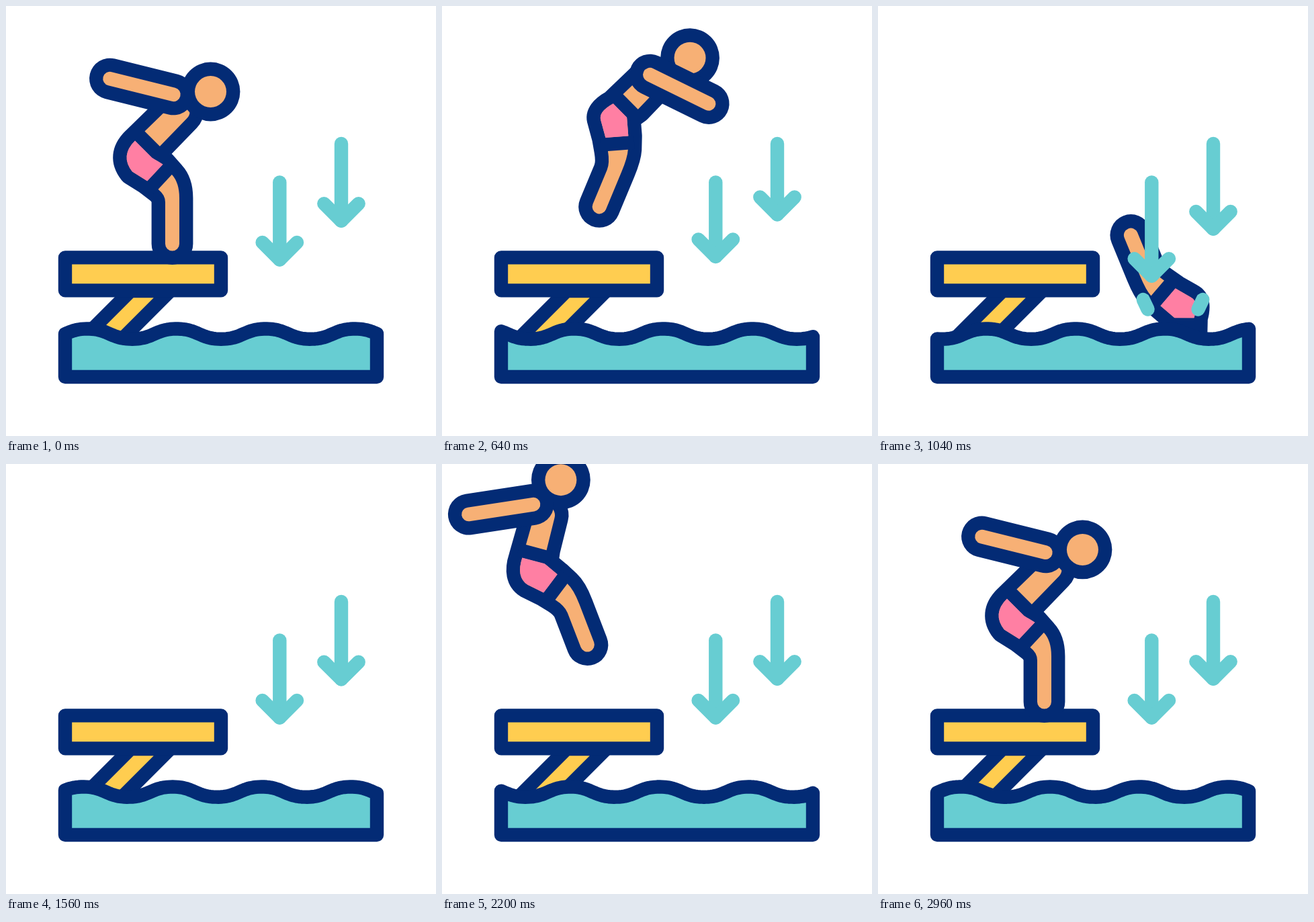
Animation, 640 px wide and 640 px high, one loop 3000 ms. Source, as an HTML page with a canvas:

```html
<!DOCTYPE html>
<html lang="en">
<head>
<meta charset="utf-8">
<title>Diver</title>
<style>
  html, body { margin: 0; width: 100%; height: 100%; overflow: hidden; background: #fff; }
  canvas { display: block; width: 100vw; height: 100vh; }
</style>
</head>
<body>
<canvas id="stage" width="640" height="640"></canvas>
<script>
const ctx = document.getElementById('stage').getContext('2d');
const NAVY = '#032b75', SKIN = '#f7b075', PINK = '#ff7fa3', YELLOW = '#ffcd50', TEAL = '#67cdd2';
const LOOP = 3000, LINE = 20.4, THIGH = 72, ARM = 97.5;
const CUFF = 37, HEM = 57, CALF = 10.5, CHEST = 15;

// A pose: foot position, shin length, limb angles in degrees,
// then shoulder and head measured along and across the torso
const STAND = { x: 247.5, y: 354, leg: 82, shin: -90, thigh: -137, torso: -45, arm: 194,
  reach: 103, back: -26, headUp: 145, headOut: 10 };
const LEAP = { x: 234.5, y: 299, leg: 75, shin: -67.7, thigh: -94.7, torso: -45, arm: 26,
  reach: 76, back: -3, headUp: 136, headOut: 21 };
const FALL = { x: 216, y: 268, leg: 75, shin: -111.3, thigh: -143, torso: -75.3, arm: 171,
  reach: 93, back: -21, headUp: 139, headOut: 9 };
const SQUAT = { shin: 1, thigh: 1, torso: 4.4, arm: -8, reach: -8, back: -5 };

const rad = deg => deg * Math.PI / 180;
const dir = deg => [Math.cos(rad(deg)), Math.sin(rad(deg))];
const move = (p, d, along, across = 0) =>
  [p[0] + d[0] * along - d[1] * across, p[1] + d[1] * along + d[0] * across];
const clamp = u => Math.min(1, Math.max(0, u));
const ease = u => (1 - Math.cos(Math.PI * clamp(u))) / 2;

const mapPose = (pose, fn) =>
  Object.fromEntries(Object.entries(pose).map(([key, v]) => [key, fn(v, key)]));
const mix = (a, b, u) => mapPose(a, (v, key) => v + (b[key] - v) * u);
const squat = (pose, amount) => mapPose(pose, (v, key) => v + (SQUAT[key] || 0) * amount);

function disc(p, r, color) {
  ctx.fillStyle = color;
  ctx.beginPath();
  ctx.arc(...p, r, 0, 2 * Math.PI);
  ctx.fill();
}

function line(points, color, fill, width = LINE) {
  ctx.beginPath();
  points.forEach(p => ctx.lineTo(...p));
  if (fill) {
    ctx.closePath();
    ctx.fillStyle = fill;
    ctx.fill();
  }
  ctx.strokeStyle = color;
  ctx.lineWidth = width;
  ctx.stroke();
}

function joints(pose) {
  const shin = dir(pose.shin), thigh = dir(pose.thigh), torso = dir(pose.torso);
  const foot = [pose.x, pose.y];
  const knee = move(foot, shin, pose.leg);
  const hip = move(knee, thigh, THIGH);
  return { shin, thigh, torso, foot, knee, hip };
}

function diver(pose) {
  const { shin, thigh, torso, foot, knee, hip } = joints(pose);
  const shift = 6 + 0.3 * pose.back, waist = 6 - 0.3 * pose.back;
  const onTorso = (along, across) => move(hip, torso, along, across);
  const onThigh = (along, across) => move(hip, thigh, -along, across);
  const onShin = (along, across) => move(knee, shin, -along, across);

  const chest = onTorso(pose.reach - 11, shift);
  const shoulder = onTorso(pose.reach, pose.back);
  const hand = move(shoulder, dir(pose.arm), ARM);
  const head = onTorso(pose.headUp, pose.headOut);
  const waistBack = onTorso(waist, shift - 16), waistFront = onTorso(waist, 18);
  const cuffBack = onThigh(CUFF, -17), cuffFront = onThigh(CUFF, 17);

  const seat = path => {
    path.lineTo(...waistBack);
    path.quadraticCurveTo(...onTorso(-18, -18), ...onThigh(11, -22));
    path.lineTo(...cuffBack);
  };

  const body = new Path2D();
  seat(body);
  body.lineTo(...onThigh(HEM, -15));
  body.quadraticCurveTo(...onShin(9, -CALF), ...onShin(20, -CALF));
  body.arc(...foot, CALF, rad(pose.shin - 90), rad(pose.shin + 90), true);
  body.lineTo(...onShin(14, CALF));
  body.quadraticCurveTo(...onShin(-9, CALF), ...onThigh(HEM, 15));
  body.lineTo(...cuffFront);
  body.lineTo(...waistFront);
  body.lineTo(...onTorso(waist + 20, shift + 16));
  body.arc(...chest, CHEST, rad(pose.torso + 90), rad(pose.torso - 90), true);
  body.closePath();

  const shorts = new Path2D();
  seat(shorts);
  shorts.lineTo(...cuffFront);
  shorts.lineTo(...waistFront);

  ctx.strokeStyle = NAVY;
  ctx.lineWidth = 2 * LINE;
  ctx.stroke(body);
  ctx.fillStyle = SKIN;
  ctx.fill(body);
  ctx.lineCap = 'butt';
  line([onTorso(waist + 10, -25), onTorso(waist + 10, 25)], NAVY);
  line([onThigh(47, -25), onThigh(47, 25)], NAVY);
  ctx.lineCap = 'round';
  ctx.fillStyle = PINK;
  ctx.fill(shorts);

  disc(head, 43.9, NAVY);
  disc(head, 23.5, SKIN);
  line([shoulder, hand], NAVY, null, 3 * LINE);
  line([shoulder, hand], SKIN, null, LINE + 0.4);
}

function jump(t) {
  const lift = clamp((t - 420) / 220);
  const pose = mix(STAND, LEAP, ease((t - 240) / 400));
  pose.y = STAND.y + (LEAP.y - STAND.y) * lift * (2 - lift);
  diver(squat(pose, Math.sin(Math.PI * clamp(t / 420))));
}

// The leap pose turns about the hip along a falling arc
function dive(t) {
  const u = (t - 640) / 400;
  const [x, y] = joints(LEAP).hip;
  ctx.translate(x + 202 * u, y + 298 * u * u);
  ctx.rotate(rad(135 * u));
  ctx.translate(-x, -y);
  diver({ ...LEAP, arm: LEAP.arm - 60 * u });
}

function land(t) {
  const drop = Math.min(1, (t - 2200) / 80);
  const pose = mix(FALL, STAND, drop < 0 ? drop * 0.2 : drop);
  pose.x = FALL.x + (STAND.x - FALL.x) * drop;
  pose.y = FALL.y + (STAND.y - FALL.y) * drop;
  const settle = clamp((t - 2240) / 640);
  diver(squat(pose, 1.63 * Math.sin(Math.PI * Math.sqrt(settle))));
}

function athlete(t) {
  ctx.save();
  ctx.beginPath();
  ctx.rect(0, 0, 640, 525);
  ctx.clip();
  if (t < 640) jump(t);
  else if (t < 1240) dive(t);
  else if (t > 1880) land(t);
  ctx.restore();
}

function board() {
  line([[185.5, 424], [244.5, 424], [158.5, 510], [99.5, 510]], NAVY, YELLOW);
  line([[88, 374.4], [320, 374.4], [320, 423.4], [88, 423.4]], NAVY, YELLOW);
}

function splash(t) {
  const s = t - 1000;
  if (s < -50 || s > 480) return;
  const cy = 456 - 0.32 * s + 0.0008 * s * s;
  const vx = 0.12, vy = -0.32 + 0.0016 * s, k = 8 / Math.hypot(vx, vy);
  for (const side of [-1, 1]) {
    const cx = 439 + side * (36 + vx * s);
    const dx = side * vx * k, dy = vy * k;
    line([[cx - dx, cy - dy], [cx + dx, cy + dy]], TEAL);
  }
}

function water(t) {
  const points = [[552, 552], [88, 552]];
  for (let x = 88; x <= 552; x += 4) {
    const a = (x - 254 + 0.0889 * t) * 2 * Math.PI / 132.7;
    points.push([x, 488.1 - 8 * (Math.cos(a) - 0.05 * Math.cos(3 * a))]);
  }
  line(points, NAVY, TEAL);
}

function arrow(x, top, tip, t) {
  const end = tip - 10 * ease((t - 200) / 280) + 35 * ease((t - 480) / 620) - 25 * ease((t - 1100) / 290);
  line([[x, top], [x, end]], TEAL);
  line([[x - 25.7, end - 25.7], [x, end], [x + 25.7, end - 25.7]], TEAL);
}

function draw(t) {
  ctx.fillStyle = '#fff';
  ctx.fillRect(0, 0, 640, 640);
  ctx.lineCap = ctx.lineJoin = 'round';
  board();
  athlete(t);
  splash(t);
  water(t);
  arrow(407.3, 262.5, 377.6, t);
  arrow(499, 205, 319.8, t - 200);
}

const start = performance.now();
function tick() {
  draw((performance.now() - start) % LOOP);
  requestAnimationFrame(tick);
}
tick();
</script>
</body>
</html>
```
